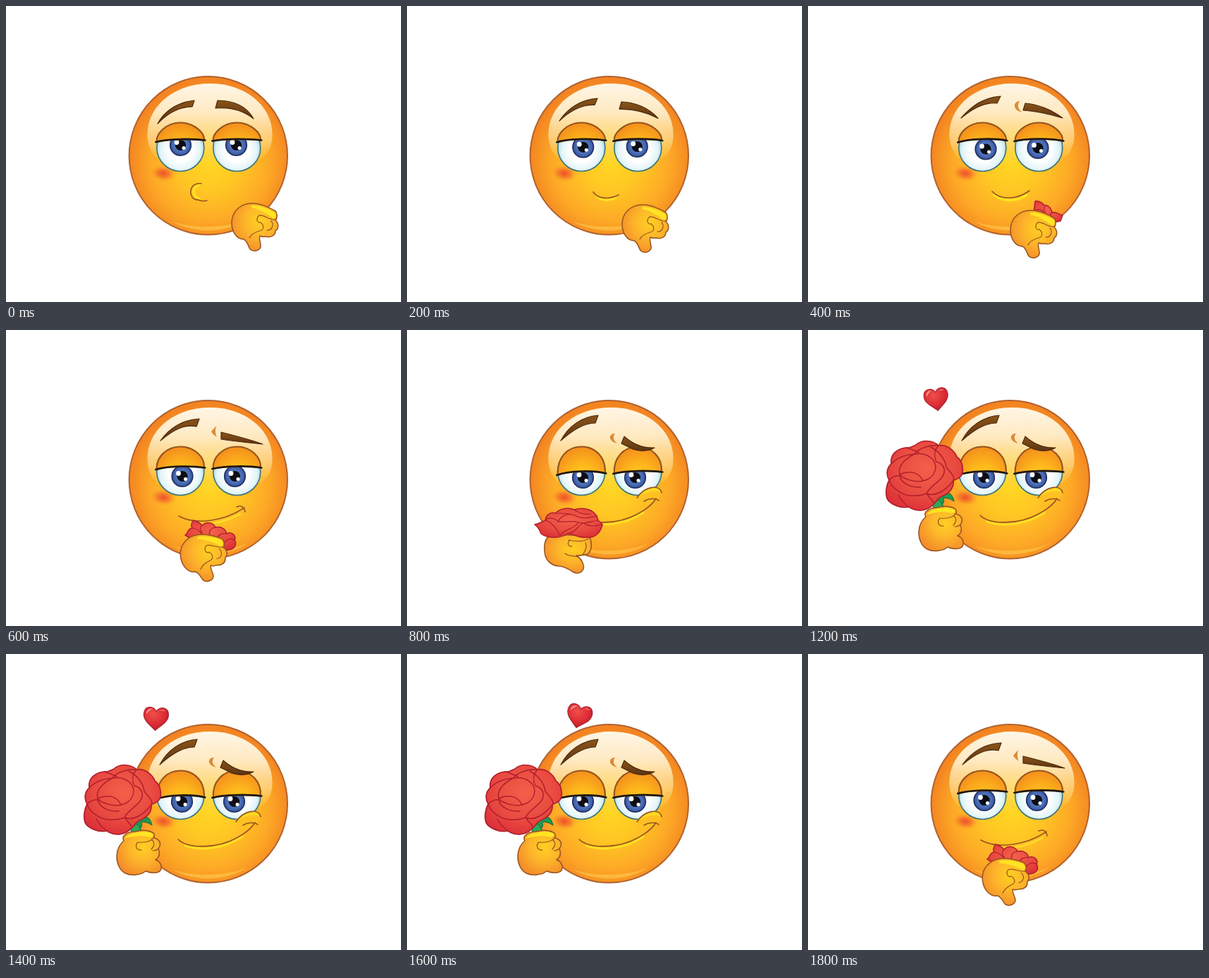
Write an HTML page that moves like this. It is 560 by 420 pixels and loops after 2 s.

```html
<!DOCTYPE html>
<html lang="en">
<head>
<meta charset="utf-8">
<title>Rose for you</title>
<style>
html, body { margin: 0; width: 100%; height: 100%; overflow: hidden; background: #fff; }
svg { display: block; width: 100vw; height: 100vh; }
path, circle { stroke-linecap: round; stroke-linejoin: round; }
</style>
</head>
<body>
<svg viewBox="0 0 560 420">
  <defs>
    <radialGradient id="skin" gradientUnits="userSpaceOnUse" cx="289" cy="222" r="116">
      <stop offset="0" stop-color="#ffd722"/><stop offset=".35" stop-color="#ffc724"/>
      <stop offset=".72" stop-color="#fda926"/><stop offset="1" stop-color="#f38421"/>
    </radialGradient>
    <linearGradient id="gloss" gradientUnits="userSpaceOnUse" x1="0" y1="110" x2="0" y2="228">
      <stop offset="0" stop-color="#fff6e6"/><stop offset=".35" stop-color="#ffedca" stop-opacity=".95"/>
      <stop offset=".7" stop-color="#ffe29a" stop-opacity=".62"/><stop offset="1" stop-color="#ffd94a" stop-opacity="0"/>
    </linearGradient>
    <radialGradient id="blush">
      <stop offset="0" stop-color="#ee4a2c" stop-opacity=".95"/><stop offset=".45" stop-color="#f2602a" stop-opacity=".65"/>
      <stop offset="1" stop-color="#f89a25" stop-opacity="0"/>
    </radialGradient>
    <radialGradient id="white" cx=".5" cy=".55" r=".5">
      <stop offset=".5" stop-color="#fff"/><stop offset=".85" stop-color="#e2f4f8"/><stop offset="1" stop-color="#b3dbe6"/>
    </radialGradient>
    <radialGradient id="lid" gradientUnits="userSpaceOnUse" cx="2" cy="8" r="46">
      <stop offset="0" stop-color="#ffd01c"/><stop offset=".45" stop-color="#fdb41c"/><stop offset="1" stop-color="#f28a1c"/>
    </radialGradient>
    <radialGradient id="iris">
      <stop offset="0" stop-color="#5b86cc"/><stop offset=".7" stop-color="#4a6db6"/><stop offset="1" stop-color="#344f96"/>
    </radialGradient>
    <linearGradient id="brow" x1="0" y1="0" x2="0" y2="1">
      <stop offset="0" stop-color="#8a5418"/><stop offset="1" stop-color="#5c3412"/>
    </linearGradient>
    <radialGradient id="palm" cx=".6" cy=".38" r=".7">
      <stop offset="0" stop-color="#ffcf22"/><stop offset=".45" stop-color="#fdb62a"/><stop offset="1" stop-color="#f3882a"/>
    </radialGradient>
    <radialGradient id="petal" cx=".52" cy=".4" r=".65">
      <stop offset="0" stop-color="#f2604a"/><stop offset=".6" stop-color="#e94a40"/><stop offset="1" stop-color="#dc3038"/>
    </radialGradient>
    <radialGradient id="love" cx=".4" cy=".3" r=".75">
      <stop offset="0" stop-color="#f0504a"/><stop offset=".6" stop-color="#dc2b35"/><stop offset="1" stop-color="#b81b2c"/>
    </radialGradient>
    <clipPath id="ball"><circle r="33.5"/></clipPath>
  </defs>
  <circle cx="286.8" cy="212.3" r="112.2" fill="url(#skin)" stroke="#b0622f" stroke-width="2"/>
  <path d="M236 306C268 324 314 322 342 303C314 315 268 317 236 306Z" fill="#ffd052" opacity=".55"/>
  <path d="M213 216C204 206 200 194 200.5 180C202 140 240 110 289 110C338 110 376 140 377.5 180C378 194 374 206 365 214C340 232 240 232 213 216Z" fill="url(#gloss)"/>
  <g id="scene"></g>
</svg>
<script>
const STEP = 200, COUNT = 10;
const BROWN = '#96541f', CRIMSON = '#b01f2c';
const scene = document.getElementById('scene');

const shape = (d, fill, stroke = 'none', w = 1.5) =>
  `<path d="${d}" fill="${fill}" stroke="${stroke}" stroke-width="${w}"/>`;
const line = (d, stroke = BROWN, w = 1.6) => shape(d, 'none', stroke, w);
const place = (x, y, turn, body) => `<g transform="translate(${x} ${y}) rotate(${turn})">${body}</g>`;

// Blend two paths or lists that share one structure
const midPath = (a, b) => {
  const other = b.match(/-?[\d.]+/g);
  let i = 0;
  return a.replace(/-?[\d.]+/g, n => (+n + +other[i++]) / 2);
};
const midList = (a, b) => a.map((v, i) => (v + b[i]) / 2);

// lids: left, middle and right height per eye; iris: x, y per eye
const cool = {
  brows: ['M215 167C225 148 245 136 267 134L264 143C247 143 230 151 215 167Z',
          'M300 134C322 134 341 142 351 160C336 148 318 143 297 145Z'],
  lids: [193, 188.5, 190.5, 191.5, 188.5, 190.5],
  iris: [247.5, 197.5, 326.5, 197.5],
  mouth: line('M274 254C263 258 264 270 274 273', '#ffe51f', 3) +
         line('M277 252C258 249 257 276 273 275M272 275C276 277 281 277 285 276')
};
const soft = {
  brows: ['M217 159C232 142 248 130 273 128L268 138C249 136 232 147 217 159Z',
          'M308 138C325 139 345 147 361 159C344 154 322 149 305 148Z'],
  lids: [193.5, 188, 191, 192, 188, 191.5],
  iris: [252, 203, 326, 201.5],
  crease: 'M300 135C290 136 290 148 304 151C298 147 296 141 300 135Z',
  mouth: line('M264 268C280 280 298 276 310 268', '#ffe51f', 3.5) +
         line('M261 263C274 277 298 274 314 262')
};
const hint = {
  brows: cool.brows.map((d, i) => midPath(d, soft.brows[i])),
  lids: midList(cool.lids, soft.lids),
  iris: midList(cool.iris, soft.iris),
  mouth: line('M268 269C276 277 286 277 296 272', '#ffe51f', 3) +
         line('M264 264C271 274 286 275 300 268')
};
const sly = {
  brows: ['M219 157C231 140 250 127 274 126L270 137C252 133 236 143 219 157Z',
          'M305 145C325 150 345 155 364 162C345 160 325 158 305 155Z'],
  lids: [198, 193, 195.5, 197, 193, 195.5],
  iris: [250, 207.5, 324.5, 207.5],
  crease: 'M298 136C296 143 297 148 299 152C295 149 292 147 291 144Z',
  mouth: line('M262 274C290 279 314 271 332 261', '#ffe02a', 2.5) +
         line('M245 264C270 278 312 270 338 252M327 251C334 248 338 252 339 258')
};
const smug = {
  brows: ['M218 157C229 136 248 123 271 121L267 132C250 132 234 143 218 157Z',
          'M308 151C319 161 334 168 351 167C341 173 328 172 320 169C314 166 308 163 304 161Z'],
  lids: [206, 199.5, 203.5, 204, 199.5, 201.5],
  iris: [249.5, 209.5, 323.5, 209.5],
  crease: 'M288 148C296 146 301 151 298 160C288 162 286 157 293 154C295 151 292 149 288 148Z',
  mouth: shape('M326 239C335 222 358 218 361 231C360 241 343 249 328 246Z', '#ffc023') +
         shape('M326 238C337 222 358 219 361 231C350 226 339 230 326 238Z', '#ffd922') +
         line('M326 238C337 222 358 218 361 231') +
         line('M254 272C278 280 310 276 335 259', '#ffe022', 3) +
         line('M244 263C258 277 300 276 327 261C340 254 349 246 353 239M336 243C342 239 352 238 357 242')
};
smug.crease = 'M295 147C285 147 285 158 298 161C293 157 291 152 295 147Z';

function eye(cx, lids, ix, iy) {
  const [a, m, b] = lids.map(y => y - 201);
  const x = ix - cx, y = iy - 201;
  return place(cx, 201, 0,
    `<circle r="33.5" fill="url(#white)" stroke="#39727d" stroke-width="1.6"/>
    <g clip-path="url(#ball)">
      <circle cx="${x}" cy="${y}" r="14.8" fill="url(#iris)" stroke="#1e2e62" stroke-width="1.6"/>
      <circle cx="${x}" cy="${y}" r="7.6" fill="#0c0d15"/>
      <circle cx="${x - 5.5}" cy="${y - 4}" r="3.4" fill="#fff"/>
      <circle cx="${x + 4.5}" cy="${y + 4}" r="2.5" fill="#fff"/>
    </g>` +
    shape(`M-33.5 ${a}C-35 -20 -20 -35.5 0 -35.5C20 -35.5 35 -20 33.5 ${b}C18 ${m} -18 ${m} -33.5 ${a}Z`, 'url(#lid)', BROWN, 2.2) +
    line(`M-35 ${a}C-18 ${m - .5} 18 ${m - .5} 35 ${b}`, '#1d1712', 2.6));
}

function face(p) {
  return '<ellipse cx="223" cy="237.5" rx="19" ry="12" fill="url(#blush)" transform="rotate(8 223 238)"/>' +
    eye(247.3, p.lids.slice(0, 3), p.iris[0], p.iris[1]) +
    eye(327.3, p.lids.slice(3), p.iris[2], p.iris[3]) +
    p.brows.map(d => shape(d, 'url(#brow)', '#4d290d', 1.2)).join('') +
    (p.crease ? shape(p.crease, '#dc8b35') : '') + p.mouth;
}

const fist =
  shape('M-25 2C-25 -15 -12 -27 6 -26C15 -26 29 -20 37 -15C40 -12 40 -5 37 -2C42 2 42 10 37 13C37 20 30 23 23 21C20 22 17 21 15 20C13 25 17 32 16 36C14 42 5 43 1 39C-2 34 -3 27 -8 25C-18 25 -25 14 -25 2Z', 'url(#palm)', BROWN) +
  shape('M3 -23C15 -24 30 -17 36 -13C39 -9 38 -5 34 -4C27 -11 13 -18 3 -20Z', '#ffe423') +
  line('M14 -9C22 -10 29 -1 38 -3M14 -9C8 -4 12 3 16 1M31 -1C36 5 31 13 25 12M16 1C22 6 20 12 15 13C8 15 2 19 0 23', BROWN, 1.2);

const cupped =
  shape('M195 313C194 301 198 293 205 290L258 292C263 301 262 313 257 317C253 320 247 320 240 320C247 324 252 333 250 339C247 346 240 346 235 343C228 339 223 335 215 335C203 334 195 325 195 313Z', 'url(#palm)', BROWN) +
  line('M229 298C241 301 252 300 257 296M231 298C226 303 229 308 234 307M253 302C256 308 252 315 249 319M224 317C230 322 239 320 243 322', BROWN, 1.2);

const holding =
  shape('M157 287C157 277 162 269 167 265C163 258 172 252 183 252C191 250 200 249 207 253C211 255 211 259 209 261C218 262 221 270 216 276C219 284 217 289 212 292C219 294 222 302 219 307C215 312 205 311 198 308C191 314 177 315 169 311C161 307 157 297 157 287Z', 'url(#palm)', BROWN) +
  shape('M168 262C172 253 196 250 207 254C211 257 207 260 203 260C193 257 181 258 168 262Z', '#ffe423') +
  line('M187 267C196 268 206 266 209 261M187 267C182 272 185 279 192 278M206 263C211 267 211 272 206 277M216 276C214 278 211 279 208 279', BROWN, 1.2);

const bud =
  shape('M320 292L322 277C328 276 333 280 335 283C341 281 345 288 346 293C352 291 355 296 361 297L358 305L349 307L330 297Z', 'url(#petal)', CRIMSON) +
  line('M323 290C328 287 333 290 335 294M336 284C333 288 335 291 337 294M346 293C342 295 343 298 348 300', CRIMSON, 1.1);

const opening =
  shape('M254 291C259 288 256 283 264 281C261 276 263 273 266 270C272 272 276 275 278 277C284 271 294 273 297 280C306 278 313 284 312 289C321 285 327 293 324 298C328 304 324 311 316 312L300 313L262 296Z', 'url(#petal)', CRIMSON) +
  line('M264 281C272 282 276 287 280 292M278 277C274 281 275 284 278 288M297 280C290 281 287 286 289 291M312 289C305 288 300 291 300 297M324 298C317 294 311 298 309 304', CRIMSON, 1.2);

const sideRose =
  shape('M181 276C187 275 192 272 196 270C197 261 205 258 210 260C217 253 229 251 237 255C249 251 263 254 269 264L271 270C273 272 275 273 277 276C275 286 267 296 255 294C245 296 236 289 228 289C219 295 200 297 190 289C188 283 185 279 181 276Z', 'url(#petal)', CRIMSON) +
  line('M196 270C207 273 213 284 217 292M196 270C201 264 211 268 214 272C218 263 230 259 238 263C249 270 262 265 269 264M214 272C224 273 234 270 243 273C251 276 262 271 271 270M217 292C222 282 237 283 243 273M228 289C242 286 242 276 250 274C260 280 268 278 277 276M210 260C218 260 225 260 231 261M237 255C244 260 253 262 260 261', CRIMSON, 1.2);

const stem =
  shape('M175 244L187 239C190 245 192 251 193 255L174 262C179 255 178 248 175 244Z', '#2fa85a', '#157343', 1.2) +
  shape('M164 255C170 243 180 234 191 231C199 229 205 233 207 243C200 237 195 239 192 238C193 243 193 245 190 247C188 241 184 241 180 243C176 249 171 250 164 255Z', '#1f9b50', '#157343', 1.1);

const fullRose =
  shape('M118 190C116 176 127 168 139 167C146 168 150 164 153 163C160 156 176 155 185 164C196 162 207 170 211 180C221 187 221 203 216 208C212 213 207 212 206 214C207 225 200 231 192 235C184 237 184 242 179 246C170 257 154 259 143 251C132 254 116 247 112 239C109 230 112 218 115 213C110 205 112 195 118 190Z', 'url(#petal)', CRIMSON, 1.7) +
  line('M118 190C127 180 140 177 151 176C157 167 174 163 185 164M139 167C147 169 153 172 157 174M151 176C168 173 181 183 181 195C180 206 172 212 163 214C152 217 134 211 130 205C127 195 135 184 151 176M130 205C143 199 157 201 163 214M185 164C178 172 179 181 182 187C194 190 196 201 190 209C184 217 174 221 168 232M174 166C187 173 195 184 196 195C203 203 209 209 206 214M115 213C121 207 126 206 130 207C132 217 145 224 160 223M115 213C118 224 135 237 151 235C160 235 166 233 168 232C180 237 194 229 206 214M143 251C138 247 133 244 128 234M168 232C173 239 177 242 179 246', CRIMSON, 1.5);

const heart = (x, y, turn, k) => place(x, y, turn, `<g transform="scale(${k})">` +
  shape('M0 -10C4 -18 17 -18 17.5 -6C18 4 7 10 0 17C-7 10 -18 4 -17.5 -6C-17 -18 -4 -18 0 -10Z', 'url(#love)', '#a81e2d', 1.2) +
  shape('M-14 -5C-14 -11 -10 -14 -6 -13C-10 -11 -12 -8 -14 -5Z', '#f9a29a') +
  shape('M5 -11C7 -14 11 -14 13 -11C10 -12 8 -12 5 -11Z', '#f38078') + '</g>');

const hearts = [[155, 130.5, -18, .94], [182, 98, -8, .97], [212.5, 91.5, 4, 1], [244, 88, 14, 1]];

function draw(n) {
  if (n === 0) return face(cool) + place(345, 306, 0, fist);
  if (n === 1) return face(hint) + place(330, 308, 0, fist);
  if (n === 2) return face(soft) + bud + place(312, 316, 0, fist);
  if (n === 3 || n === 9) return face(sly) + opening + place(272, 317, -10, fist);
  if (n === 4) return face(smug) + cupped + sideRose;
  return face(smug) + stem + fullRose + holding + heart(...hearts[n - 5]);
}

let shown = -1;
const start = performance.now();
function tick() {
  const n = Math.floor((performance.now() - start) / STEP) % COUNT;
  if (n !== shown) scene.innerHTML = draw(shown = n);
  requestAnimationFrame(tick);
}
tick();
</script>
</body>
</html>
```
